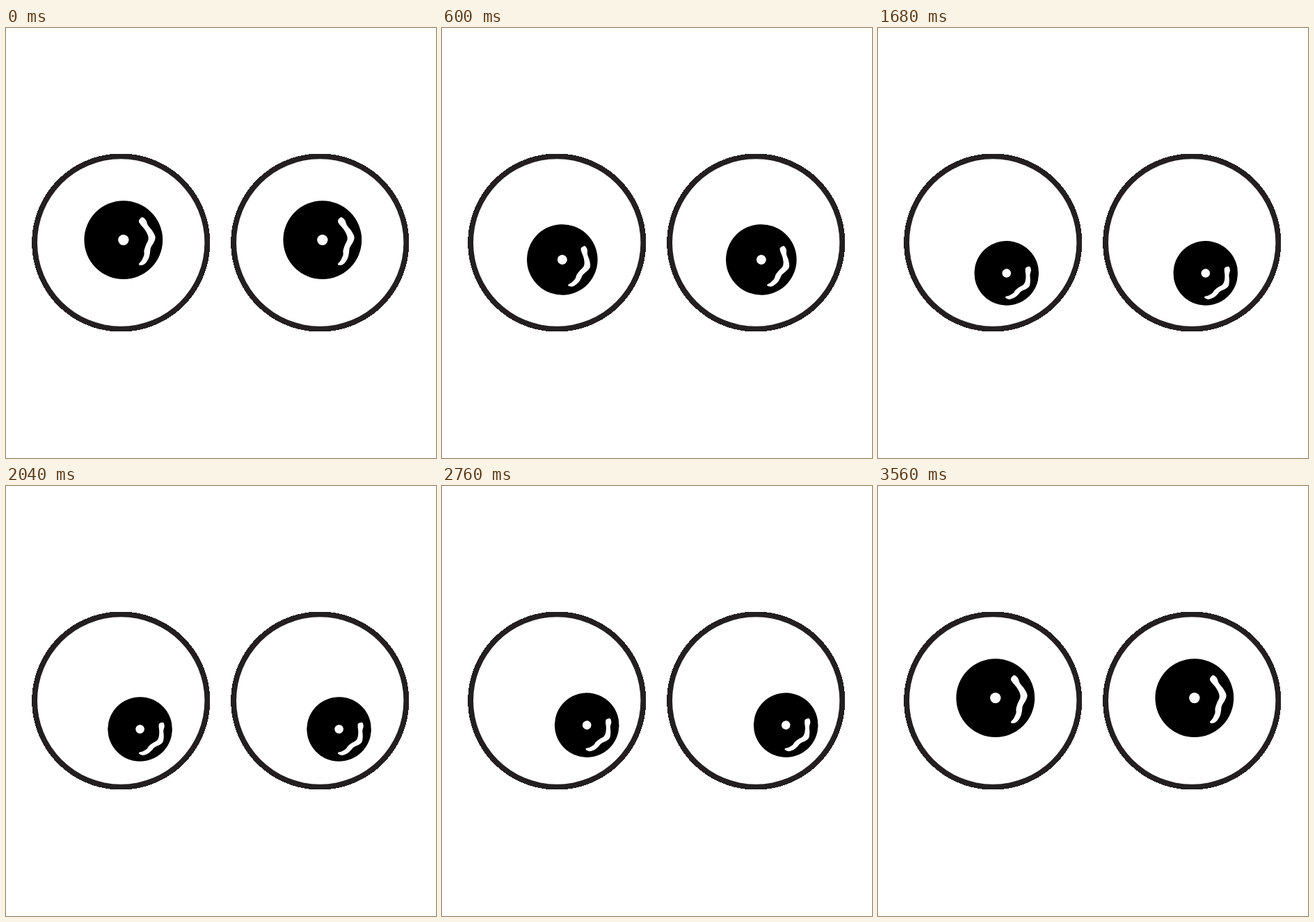
An HTML page with a canvas for the animation above (3600 ms loop, 618 by 618 pixels).

```html
<!DOCTYPE html>
<html lang="en">
<head>
<meta charset="utf-8">
<title>Eyes</title>
<style>
  html, body { margin: 0; width: 100%; height: 100%; overflow: hidden; background: #fff; }
  canvas { display: block; }
</style>
</head>
<body>
<canvas id="stage" width="618" height="618"></canvas>
<script>
const ctx = document.getElementById('stage').getContext('2d');
const STEP = 40, LOOP = 3600;
const EYE = { x: 165.2, y: 308.5, inner: 120.2, outer: 128, gap: 286 };

// Pupil poses: position, radius, rotation in degrees
const CENTER = [168.8, 304.6, 56.4, 0];
const DOWN = [176.1, 355.6, 46.3, 35];
const RIGHT = [210.8, 342.7, 46.3, 35];

// Outline of the highlight around the pupil centre at full size
const SHINE = [
  [22.2, -27.7], [26.7, -32.7], [32.2, -28.7], [35.2, -21.2], [41.2, -13.7],
  [45.7, -4.7], [44.2, 2.3], [39.2, 11.3], [38.2, 18.3], [36.2, 26.3],
  [30.7, 34.3], [24.2, 36.3], [22.2, 34.3], [26.2, 29.3], [29.7, 21.3],
  [29.7, 15.3], [32.2, 7.3], [35.7, -0.7], [34.7, -7.7], [30.2, -15.7], [24.2, -22.7]
];

function smoothPath(pts) {
  const path = new Path2D(), n = pts.length;
  path.moveTo(...pts[0]);
  for (let i = 0; i < n; i++) {
    const a = pts[(i + n - 1) % n], b = pts[i], c = pts[(i + 1) % n], d = pts[(i + 2) % n];
    path.bezierCurveTo(
      b[0] + (c[0] - a[0]) / 6, b[1] + (c[1] - a[1]) / 6,
      c[0] - (d[0] - b[0]) / 6, c[1] - (d[1] - b[1]) / 6,
      c[0], c[1]);
  }
  path.closePath();
  return path;
}
const shine = smoothPath(SHINE);

const mix = (a, b, p) => a.map((v, i) => v + (b[i] - v) * p);

function poseAt(t) {
  if (t < 1120) {
    const p = t / 1120;
    return mix(CENTER, DOWN, p + 0.08 * p * (1 - p));
  }
  if (t < 1280) return DOWN;
  if (t < 2880) return mix(DOWN, RIGHT, (t - 1280) / 1600);
  return mix(RIGHT, CENTER, Math.min(1, (t - 2880) / 680));
}

function disc(x, y, r, color) {
  ctx.fillStyle = color;
  ctx.beginPath();
  ctx.arc(x, y, r, 0, Math.PI * 2);
  ctx.fill();
}

// Disc with a hard, unsmoothed edge
function hardDisc(x, y, r, color) {
  ctx.fillStyle = color;
  for (let row = Math.floor(y - r); row <= y + r; row++) {
    const dy = row + 0.5 - y;
    if (Math.abs(dy) >= r) continue;
    const half = Math.sqrt(r * r - dy * dy);
    const left = Math.round(x - half);
    ctx.fillRect(left, row, Math.round(x + half) - left, 1);
  }
}

function drawEye(dx, [x, y, r, deg]) {
  hardDisc(EYE.x + dx, EYE.y, EYE.outer, '#231f20');
  disc(EYE.x + dx, EYE.y, EYE.inner, '#fff');
  ctx.save();
  ctx.translate(x + dx, y);
  ctx.rotate(deg * Math.PI / 180);
  ctx.scale(r / CENTER[2], r / CENTER[2]);
  disc(0, 0, CENTER[2], '#000');
  disc(0, 0, 7.7, '#fff');
  ctx.fill(shine);
  ctx.restore();
}

function draw() {
  const t = Math.floor(performance.now() % LOOP / STEP) * STEP;
  const pose = poseAt(t);
  ctx.fillStyle = '#fff';
  ctx.fillRect(0, 0, 618, 618);
  drawEye(0, pose);
  drawEye(EYE.gap, pose);
  requestAnimationFrame(draw);
}
draw();
</script>
</body>
</html>
```
